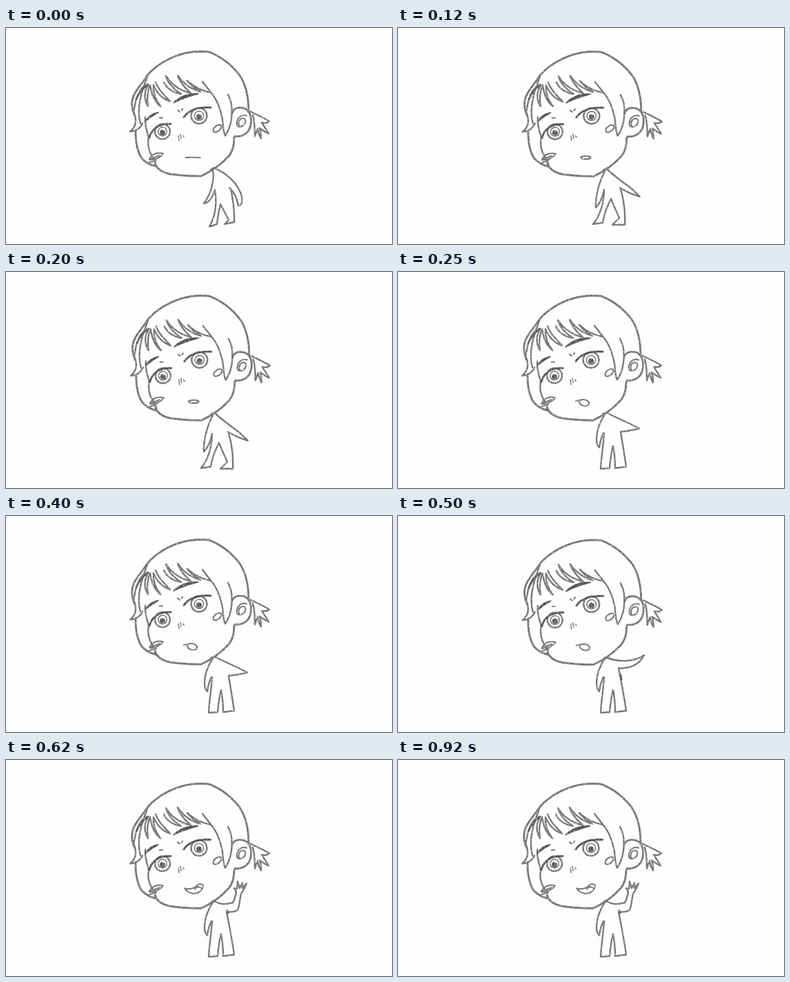
Recreate the animation shown at these times as an HTML page. Size 560 by 315 pixels, loop 1.12 s.

```html
<!DOCTYPE html>
<html lang="en">
<head>
<meta charset="utf-8">
<title>Pencil girl waving</title>
<style>
  html, body { margin: 0; width: 100%; height: 100%; overflow: hidden; background: #fefefe; }
  svg { display: block; width: 100vw; height: 100vh; }
  path, ellipse, circle { fill: none; stroke: #727272; stroke-width: 2.9; stroke-linecap: round; stroke-linejoin: round; }
  .hair { stroke-width: 2.4; }
  .thin { stroke-width: 2.1; }
  .fine { stroke-width: 1.6; }
  .dark { stroke: #505050; }
  .brow { fill: #505050; stroke: #505050; stroke-width: 1.6; }
  .ink { fill: #555; stroke: none; }
  .shine { fill: #fefefe; stroke: none; }
</style>
</head>
<body>
<svg viewBox="0 0 560 315">
  <defs>
    <filter id="pencil" filterUnits="userSpaceOnUse" x="0" y="0" width="560" height="315" color-interpolation-filters="sRGB">
      <feTurbulence id="grain" type="fractalNoise" baseFrequency=".4" numOctaves="2" seed="3" result="noise"/>
      <feDisplacementMap in="SourceGraphic" in2="noise" scale="1" xChannelSelector="R" yChannelSelector="G"/>
      <feGaussianBlur stdDeviation=".5" result="soft"/>
      <feColorMatrix in="noise" values="0 0 0 0 0  0 0 0 0 0  0 0 0 0 0  1.4 0 0 0 .25" result="mask"/>
      <feComposite in="soft" in2="mask" operator="in"/>
    </filter>
  </defs>
  <g filter="url(#pencil)">
    <g id="head">
      <!-- skull and jaw -->
      <path d="M352 122C352 104 349 84 339 69C327 53 312 42 295 35C278 33 262 35 246 41C228 48 211 60 203 72C197 82 187 91 184 102C181 112 184 123 187 128"/>
      <path d="M188 150C188 166 190 180 197 190C203 197 210 200 218 202M216 198C220 207 228 211 238 213C253 215 269 216 283 216C298 209 313 198 323 187C329 180 331 171 331 160"/>
      <!-- left locks -->
      <path class="hair" d="M206 82C197 84 189 98 187 113C185 120 185 125 187 128C190 138 186 146 180 151C188 151 195 146 198 139"/>
      <path class="hair" d="M205 71C201 82 197 92 195 103C192 116 192 128 195 139"/>
      <path class="hair dark" d="M206 83C199 87 193 95 189 104"/>
      <path class="hair" d="M202 130C201 140 204 150 207 159C205 169 207 180 212 187C216 191 217 197 218 202"/>
      <!-- fringe -->
      <path class="hair" d="M206 84C200 92 200 104 206 114C204 101 205 92 209 83C211 97 215 107 224 114C217 105 213 94 214 83C219 95 226 103 238 107C229 97 221 90 217 79"/>
      <path class="hair" d="M229 79C233 88 242 94 254 96C243 89 235 81 232 70C240 83 252 91 268 95C258 86 252 79 249 69C257 81 267 89 282 93C274 88 267 82 263 77C274 87 284 92 297 94"/>
      <path class="hair" d="M285 78C289 84 294 89 298 95C305 103 311 118 314 133C315 143 315 151 318 157C326 145 329 128 327 111C326 105 324 101 322 97"/>
      <!-- ear and tail -->
      <path d="M328 124C330 117 337 115 345 117C354 120 357 130 355 141C353 153 344 159 332 158"/>
      <path class="thin" d="M349 128C341 125 334 132 335 141C337 146 345 144 347 138C349 132 344 130 340 133C337 136 337 139 338 143"/>
      <path class="hair" d="M355 122C363 126 374 131 382 136C379 139 375 139 371 138C375 144 378 149 381 154C376 152 372 149 368 146C370 152 370 156 370 161C367 157 366 152 365 147C363 152 362 155 361 158C361 148 361 137 358 127"/>
      <!-- brows -->
      <path class="brow" d="M243 109C252 100 264 95 279 96C267 99 255 103 243 109Z"/>
      <path class="brow" d="M202 136C207 128 213 124 221 123C214 127 208 131 202 136Z"/>
      <path class="thin" d="M249 120L252 122M256 118L255 120M223 131L227 131"/>
      <!-- eyes -->
      <g id="eyes"></g>
      <path class="dark" d="M258 130C265 120 279 115 297 116"/>
      <path class="dark" d="M208 160C211 148 221 139 239 140"/>
      <!-- nose and cheeks -->
      <path class="fine" d="M250 157L251 164M253 155L254 161M257 157L258 159"/>
      <ellipse class="thin" cx="306.500" cy="146.500" rx="7" ry="4" transform="rotate(-38 306.500 146.500)"/>
      <path class="thin" d="M208 192C211 184 219 181 228 183C224 189 216 193 208 192L222 186M208 196L218 193"/>
      <path id="mouth" class="thin"/>
    </g>
    <path id="body" class="hair"/>
    <path id="accent" class="dark"/>
  </g>
</svg>
<script>
const get = id => document.getElementById(id);

const eye = (x, y, r) => `
  <circle class="hair" cx="${x}" cy="${y}" r="${r}"/>
  <circle class="fine" cx="${x}" cy="${y}" r="${r * .58}"/>
  <circle class="ink" cx="${x}" cy="${y + 1.500}" r="4"/>
  <circle class="shine" cx="${x + 2}" cy="${y - 3.500}" r="2"/>`;
get("eyes").innerHTML = eye(280, 128, 11.5) + eye(227, 151, 11);

const legs = "C326 252 329 269 331 284L315 286C315 274 314 263 312 254C309 264 308 276 307 286L294 287C295 269 298 252 299 235";
const restArm = "M301 206C293 218 288 231 288 244C288 250 290 254 292 256C293 248 295 241 298 235";
const pout = "M258 188C262 188 267 185 271 186C276 187 279 191 276 194C271 197 264 194 263 189";

const poses = [
  {
    at: 0, shift: [0, 0], mouth: "M261 189C268 188 275 189 282 189",
    body: "M297 206L301 204C318 210 335 225 341 242C344 253 342 259 337 259C335 248 331 239 324 233" +
      "M300 207C303 224 297 242 287 256C295 255 300 246 303 236C306 254 304 274 295 290L306 286C307 276 309 266 311 257C315 265 320 273 323 280L317 286L331 283C332 266 329 249 326 234"
  },
  {
    at: 120, shift: [.8, .3], mouth: "M264 188C269 186 275 186 279 188C279 191 274 191 268 191C265 190 264 189 264 188",
    body: "M298 207L302 205C313 215 325 224 336 232C342 237 347 242 351 246C341 243 331 239 322 233" +
      "M301 207C292 224 286 245 287 262C293 256 297 246 299 236C299 253 294 273 283 286L297 284C299 270 304 259 309 249C313 260 318 269 321 277L311 287L329 287C330 269 328 252 323 235"
  },
  {
    at: 250, shift: [0, .2], mouth: pout,
    body: restArm + "M297 207L302 205C318 213 335 220 350 228C341 231 332 232 323 233" + legs
  },
  {
    at: 500, shift: [.7, .8], mouth: pout, accent: "M323 232L324 238",
    body: restArm + "M299 209L304 207C323 214 344 212 357 203C350 217 336 223 320 222" + legs
  },
  {
    at: 620, shift: [0, .2], mouth: "M259 187C266 189 273 187 278 182C282 179 286 181 286 184C284 192 277 196 269 194C264 193 261 190 259 187M274 188C277 184 281 184 284 187",
    accent: "M321 220L322 223",
    body: restArm + "M298 207L303 206C310 211 319 211 329 208C332 202 334 197 334 192L331 187L335 188L336 177L339 187L343 179L343 187L349 180C347 186 344 191 341 195C339 204 339 212 336 219C331 222 326 222 320 221" + legs
  }
];

const loop = 1120;
let shown = null;

function draw(time) {
  const t = time % loop;
  const pose = poses.findLast(p => p.at <= t);
  if (pose !== shown) {
    shown = pose;
    get("head").setAttribute("transform", `translate(${pose.shift})`);
    get("mouth").setAttribute("d", pose.mouth);
    get("body").setAttribute("d", pose.body);
    get("accent").setAttribute("d", pose.accent || "");
    get("grain").setAttribute("seed", 3 + poses.indexOf(pose));
  }
}

const start = performance.now();
function tick() {
  draw(performance.now() - start);
  requestAnimationFrame(tick);
}
tick();
</script>
</body>
</html>
```
